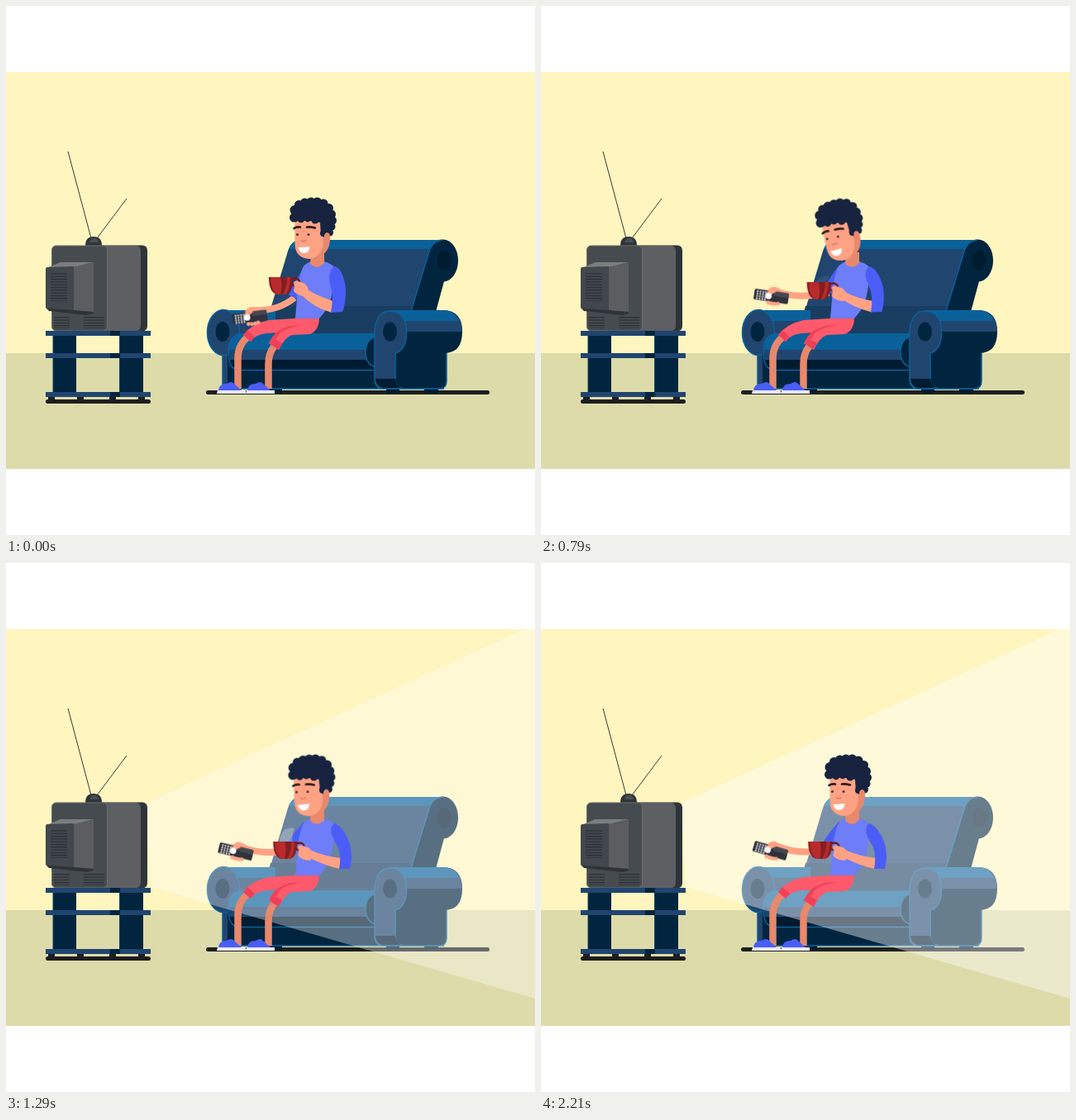
An HTML page that plays this animation: 640 by 640 pixels, repeating every 2280 ms.

```html
<!DOCTYPE html>
<html lang="en">
<head>
<meta charset="utf-8">
<title>Evening on the sofa</title>
<style>
html, body { margin: 0; width: 100%; height: 100%; overflow: hidden; background: #fff; }
svg { display: block; width: 100vw; height: 100vh; }

.navy { fill: #02253f; }
.deep { fill: #011b30; }
.blue { fill: #20456f; }
.light { fill: #0a619a; }
.edge { stroke: #0a619a; stroke-width: 1.5; }
.line { fill: none; stroke: #0a619a; stroke-width: 1.5; }
.skin { fill: #ffa284; }
.shade { fill: #e8886c; }
.shirt { fill: #6e7df8; }
.sleeve { fill: #4a5ef7; }
.shorts { fill: #ff5a6c; }
.hem { fill: #ee4159; }
.hair { fill: #17233f; }
.limb { fill: none; stroke: #e8886c; stroke-width: 8.5; }

/* 32 poses per loop; key poses sit two apart unless a step count says otherwise */
.a { animation: 2280ms steps(2) -5ms infinite; }
#head { animation-name: nod; transform-origin: 375px 310px; }
#eyes { animation-name: blink; transform-box: fill-box; transform-origin: center; }
#remote { animation-name: point; }
#farArm { animation-name: reach; }
#farSleeve { animation-name: farSleeve; }
.sip { animation-name: sip; }
#foreArm { animation-name: foreArm; }
#nearSleeve { animation-name: nearSleeve; }
#steam { animation-name: steam; }
#beam { animation-name: glow; }

@keyframes nod {
  0% { transform: rotate(0); }
  6.25% { transform: rotate(-4.5deg); }
  12.5% { transform: rotate(-10deg); }
  18.75%, 43.75% { transform: rotate(-11.7deg); }
  50% { transform: rotate(-7.5deg); }
  56.25% { transform: rotate(-1.7deg); }
  62.5%, 100% { transform: rotate(0); }
}
@keyframes blink {
  0%, 6.25% { transform: scaleY(1); }
  12.5%, 25% { transform: scaleY(.4); }
  31.25%, 100% { transform: scaleY(1); }
}
@keyframes point {
  0% { transform: translate(295px, 376.5px) rotate(-7deg); }
  6.25% { transform: translate(290px, 370px) rotate(-1deg); }
  12.5% { transform: translate(283.5px, 361.5px) rotate(7deg); }
  18.75% { transform: translate(279px, 352px) rotate(13deg); }
  25% { transform: translate(277.5px, 348px) rotate(16deg); }
  31.25% { transform: translate(278.2px, 350.2px) rotate(11deg); }
  37.5%, 43.75% { transform: translate(279px, 352.5px) rotate(6deg); }
  50% { transform: translate(278.5px, 351px) rotate(9deg); }
  56.25% { transform: translate(278px, 349px) rotate(13.5deg); }
  62.5%, 100% { transform: translate(277.5px, 348px) rotate(16deg); }
}
@keyframes reach {
  0% { d: path("M298 368Q328 370 349 353"); }
  6.25% { d: path("M294 362Q325 366 348.5 352"); }
  12.5% { d: path("M290 354Q322 362 348 350"); }
  18.75% { d: path("M286 346Q318 358 349 347"); }
  25% { d: path("M284 342Q315 356 350 345"); animation-timing-function: steps(4); }
  37.5%, 43.75% { d: path("M286 347Q310 355 348 347"); }
  50% { d: path("M285.5 345.5Q311 355 348 347"); animation-timing-function: steps(4); }
  62.5%, 100% { d: path("M284 342Q311 354 348 347"); }
}
@keyframes farSleeve {
  0%, 12.5% { d: path("M367 317Q356 332 347 352"); animation-timing-function: steps(4); }
  25% { d: path("M366 317Q355 330 348 348"); animation-timing-function: steps(8); }
  50%, 100% { d: path("M364 317Q354 328 345 342"); }
}
@keyframes sip {
  0%, 12.5% { transform: translate(0, 0); }
  18.75% { transform: translate(.8px, 1px); }
  25% { transform: translate(2px, 3px); }
  31.25% { transform: translate(3.2px, 5px); }
  37.5% { transform: translate(4.2px, 7px); }
  43.75% { transform: translate(5px, 8.3px); }
  50%, 100% { transform: translate(5.3px, 9px); }
}
@keyframes foreArm {
  0%, 12.5% { d: path("M366 344Q380 352 396 357L394 371Q372 365 357 349Z"); animation-timing-function: steps(4); }
  25% { d: path("M367.2 345.2Q381.8 352.9 399 357L397 370.7Q375.5 365.3 359 350.7Z"); animation-timing-function: steps(6); }
  43.75% { d: path("M369.6 347.6Q385.4 354.7 405 357L403 370.1Q382.5 365.9 363.3 354.4Z"); }
  50%, 100% { d: path("M370 348Q386 355 406 357L404 370Q384 366 364 355Z"); }
}
@keyframes nearSleeve {
  0%, 12.5% { d: path("M397 315Q408 317 411 342Q411 362 407 370L393 371Q397 352 392 336Q389 321 397 315Z"); animation-timing-function: steps(4); }
  25% { d: path("M397 315Q408 317.3 412.6 341.4Q413.6 360.3 409.5 370L396 370.8Q400 351.5 394 336.2Q389 321.4 397 315Z"); animation-timing-function: steps(6); }
  43.75% { d: path("M397 315Q408 318 415.5 340.2Q419 356.7 415 370L402 370Q406 350.2 397.5 337Q389 322 397 315Z"); }
  50%, 100% { d: path("M397 315Q408 318 416 340Q420 356 416 370L403 370Q407 350 398 337Q389 322 397 315Z"); }
}
@keyframes steam {
  0%, 31.25% { opacity: 0; transform: translateY(6px); }
  37.5% { opacity: .14; transform: translateY(4px); }
  43.75% { opacity: .28; transform: translateY(2px); }
  50% { opacity: .3; transform: translateY(0); animation-timing-function: steps(6); }
  68.75% { opacity: .2; transform: translateY(-4px); animation-timing-function: steps(8); }
  93.75%, 100% { opacity: 0; transform: translateY(-6px); }
}
@keyframes glow {
  0%, 37.5% { opacity: 0; }
  43.75% { opacity: .09; }
  50% { opacity: .23; }
  56.25% { opacity: .34; }
  62.5% { opacity: .39; }
  68.75%, 100% { opacity: .41; }
}
</style>
</head>
<body>
<svg viewBox="0 0 640 640">
  <defs>
    <pattern id="vent" width="4" height="3.3" patternUnits="userSpaceOnUse">
      <rect width="4" height="1.2" fill="#2a2f34"/>
    </pattern>
    <pattern id="keys" x="-18.5" y="-5.2" width="3.3" height="2.9" patternUnits="userSpaceOnUse">
      <circle cx="1.5" cy="1.4" r="1.05" fill="#f4f4f6"/>
    </pattern>
    <clipPath id="bowl"><path d="M318 328H347Q347 349 336 349H329Q318 348 318 328Z"/></clipPath>
    <g id="shoe">
      <path class="sleeve" d="M257 466Q257 457 267 457Q273 453 276 457L286 466Z"/>
      <path fill="#e9e7f4" d="M256 465H290V469H255Z"/>
    </g>
  </defs>

  <rect y="80" width="640" height="340" fill="#fef5bf"/>
  <rect y="420" width="640" height="140" fill="#dedbaa"/>

  <g id="sofa">
    <rect x="242" y="465" width="343" height="5" rx="2.5" fill="#1c1f21"/>
    <path class="deep" d="M318 462H334V468H318ZM460 462H476V468H460ZM506 462H523V468H506Z"/>
    <!-- backrest -->
    <path class="blue" d="M356 283H530L491 372V400H310Q325 350 340 300Q344 284 356 283Z"/>
    <path fill="#193d60" d="M320 363H495L490 398H311Z"/>
    <path class="light" d="M354 283H528L514 294H342Q346 284 354 283Z"/>
    <path class="navy" d="M527 283Q515 284 511 302L490 370H520L530 333Z"/>
    <ellipse class="navy" cx="529" cy="308" rx="18" ry="25.5"/>
    <ellipse class="deep" cx="530" cy="308" rx="8.5" ry="12"/>
    <path class="line" d="M528 283Q515 284 511 300L490 369"/>
    <!-- far armrest -->
    <path class="blue" d="M263 368H325V398H263Z"/>
    <path class="light" d="M263 368H326V381H263Z"/>
    <path class="blue edge" d="M262 415H285V463H268Q262 463 262 457Z"/>
    <ellipse class="blue edge" cx="263" cy="395" rx="19.5" ry="27.5"/>
    <ellipse class="navy" cx="262" cy="394" rx="8.5" ry="12"/>
    <!-- seat -->
    <path class="navy" d="M268 420H450V463H275Q268 463 268 456Z"/>
    <path class="blue" d="M269 414H447V428H271Z"/>
    <path class="light" d="M282 396H450V416H269Q270 399 282 396Z"/>
    <path class="deep" d="M271 428H447V440H277Q271 438 271 428Z"/>
    <path class="line" d="M282 397Q269 400 269 418Q269 440 282 440.5H447M263 463H530"/>
    <path class="navy edge" d="M452 399Q435 401 435 419Q435 436 452 438Z"/>
    <!-- near armrest -->
    <path class="navy edge" d="M470 415H533V454Q533 463 524 463H470Z"/>
    <path class="navy" d="M465 368H530Q552 369 552 394Q552 420 530 420H465Z"/>
    <path class="blue" d="M465 368H530Q551 369 552 394H465Z"/>
    <path class="light" d="M465 368H530Q543 369 548 381H465Z"/>
    <path class="blue edge" d="M446 405Q444 369 465 369Q484.500 370 484.500 395Q484.500 416 471 420V452Q471 462 481 463H456Q446 462 446 452Z"/>
    <path class="deep" d="M447 451H471Q472 460 478 462H456Q448 460 447 451Z"/>
    <ellipse class="navy" cx="464.500" cy="394" rx="8.5" ry="11.500"/>
  </g>

  <path id="beam" class="a" fill="#fff" d="M170 290L627 80H640V527L175 392Z"/>

  <g id="tv">
    <path d="M75 176L103 281M146 233L110 281" fill="none" stroke="#3a3a38"/>
    <path d="M96 290Q96 279 106 279Q116 279 116 290Z" fill="#2f3437"/>
    <path d="M101 286Q102 281 108 281Q112 283 112 286Z" fill="#4a4f52"/>
    <rect x="110" y="289.500" width="61" height="104" rx="6" fill="#2e353a"/>
    <path d="M116 290H158Q163 291 163 297V386Q163 392 158 393H116Z" fill="#5d5f63"/>
    <rect x="55.500" y="290" width="67" height="103" rx="5" fill="#464b4f" stroke="#6a6e70"/>
    <path d="M58 375H77V390H58ZM94 375H119V390H94Z" fill="url(#vent)"/>
    <path d="M48 365L82 367L106 368V372L98 374L52 369Z" fill="#2e3338"/>
    <path d="M49 317L66 310H106L82 316Z" fill="#7b7e80"/>
    <path d="M82 316L106 310V370L82 368Z" fill="#5b5d61"/>
    <path d="M50 316L82 315V368L50 366Q48 366 48 364V318Q48 316 50 316Z" fill="#41474d"/>
    <rect x="54" y="323" width="20" height="34" fill="url(#vent)"/>
  </g>

  <g id="stand">
    <path class="navy" d="M57 398H85V468H57ZM137 398H166V468H137Z"/>
    <path d="M57 399V467M137.500 399V467" stroke="#0d426d"/>
    <path class="blue" d="M48 393H175V399H48ZM48 420H175V426H48ZM48 467H175V473H48Z"/>
    <path class="navy" d="M126 393H138V399H126ZM126 420H138V426H126ZM126 467H138V473H126Z"/>
    <path fill="#1b2024" d="M51 473H59V476H51ZM86 473H94V476H86ZM125 473H133V476H125ZM160 473H168V476H160Z"/>
    <rect x="48" y="476" width="127" height="5" rx="2.500" fill="#1d1d1f"/>
  </g>

  <g id="man">
    <path id="farArm" class="a" d="M298 368Q328 370 349 353" fill="none" stroke="#ffa284" stroke-width="8"/>
    <path id="farSleeve" class="a" d="M367 317Q356 332 347 352" fill="none" stroke="#4a5ef7" stroke-width="11"/>

    <path class="limb" d="M293 400Q280.500 410 280.500 426V463M325 411Q317.500 420 317.500 433V463"/>
    <use href="#shoe"/>
    <use href="#shoe" x="35"/>
    <path class="shorts" d="M350 378L318 380Q298 384 287 398L296 406Q302 397 316 396L350 394Z"/>
    <path class="hem" d="M287 398L296 406L301 400L292 392Z"/>
    <path class="shorts" d="M350 377H379Q379 392 368 397L346 398Q338 400 330 416L318 408Q327 390 345 385Z"/>
    <path class="hem" d="M318 408L330 416L334 408L322 401ZM322 401Q328 391 344 387L368 385Q342 387 331 396L326 404Z"/>

    <path class="shirt" d="M369 309Q359 312 357 322Q352 340 352 355L350 378H379Q392 365 395 345L399 318Q394 311 384 309Z"/>
    <path class="shade" d="M369 298H385V311Q377 320 368 312Z"/>

    <g id="head" class="a">
      <path class="shade" d="M355 256H392V284Q390 303 370 306L355 300Z"/>
      <path class="skin" d="M349.500 256H384V284Q383 304 367 306Q350 305 349.500 288Z"/>
      <g class="hair">
        <path d="M348 258Q346 238 370 236Q394 236 397 262L392 278Q384 282 381 277L380 262Q366 258 348 261Z"/>
        <circle cx="348.500" cy="256" r="5.500"/><circle cx="349.500" cy="247" r="6"/>
        <circle cx="354.500" cy="240.500" r="5.500"/><circle cx="361.500" cy="238" r="5.500"/>
        <circle cx="369" cy="237" r="5.500"/><circle cx="376.500" cy="237" r="5.500"/>
        <circle cx="384" cy="239" r="5.500"/><circle cx="390.500" cy="244.500" r="5.500"/>
        <circle cx="393.500" cy="252" r="5.500"/><circle cx="394.800" cy="259.500" r="5.200"/>
        <circle cx="393.500" cy="267" r="5"/><circle cx="391.500" cy="274" r="4.500"/>
        <circle cx="384" cy="275" r="4"/><circle cx="357" cy="258" r="4.200"/>
        <circle cx="365" cy="257" r="4.200"/><circle cx="374" cy="259" r="4.500"/>
      </g>
      <ellipse class="shade" cx="388.500" cy="279.500" rx="3.600" ry="5.500"/>
      <path d="M348.500 269Q351 267 356 267.500M364 267.500Q369 267 374 268.500" fill="none" stroke="#2b1d20" stroke-width="2.600" stroke-linecap="round"/>
      <g id="eyes" class="a" fill="#5b3a34">
        <circle cx="352.500" cy="276.500" r="1.600"/><circle cx="366" cy="276.500" r="1.600"/>
      </g>
      <path d="M357.500 284Q360 285.500 362.500 284" fill="none" stroke="#e07f66" stroke-width="2" stroke-linecap="round"/>
      <path fill="#fff" d="M353.500 292Q361 292 367.500 291Q367 299 360 299Q354.500 298 353.500 292Z"/>
    </g>

    <path id="steam" class="a" fill="#fff" d="M331 344V336Q332 329 337 324Q343 321 349 322Q345 330 347 344Z"/>
    <g class="sip a">
      <ellipse cx="350" cy="334" rx="5" ry="4.500" fill="none" stroke="#6f191c" stroke-width="2.500"/>
      <g clip-path="url(#bowl)">
        <rect x="318" y="328" width="30" height="22" fill="#821d20"/>
        <path d="M320 328H332Q335 338 332 349H327Q320 342 320 328ZM340 328H344Q344 340 339 349H335Q340 340 340 328Z" fill="#b72b2c"/>
      </g>
    </g>
    <path id="foreArm" class="skin a" d="M366 344Q380 352 396 357L394 371Q372 365 357 349Z"/>
    <path id="nearSleeve" class="sleeve a" d="M397 315Q408 317 411 342Q411 362 407 370L393 371Q397 352 392 336Q389 321 397 315Z"/>
    <path class="sip skin a" d="M348 334Q351 331 356 334Q364 335 366 343L363 351Q355 351 350 347Q347 345 349 341Z"/>

    <g id="remote" class="a">
      <path class="skin" d="M-7 -3Q-5 -10 1 -12Q8 -13 16 -6V0H-7Z"/>
      <rect x="-21" y="-6.500" width="42" height="13" rx="1.500" fill="#30323b"/>
      <path d="M3 -6.500H19.500Q21 -6.500 21 -5V-1H3Z" fill="#454750"/>
      <rect x="-18.500" y="-5.200" width="13.200" height="11.600" fill="url(#keys)"/>
      <path class="skin" d="M-6 -3Q-5 -8 0 -9L5 -6Q1 -4 -1 -1Z"/>
      <circle cx="-3.300" r="3.800" fill="#fff"/>
      <g class="skin">
        <circle cx="-2.500" cy="8" r="2.400"/><circle cx="1.500" cy="8.600" r="2.400"/>
        <circle cx="5.500" cy="8.400" r="2.400"/><circle cx="9.300" cy="7.600" r="2.300"/>
      </g>
    </g>
  </g>
</svg>
</body>
</html>
```
